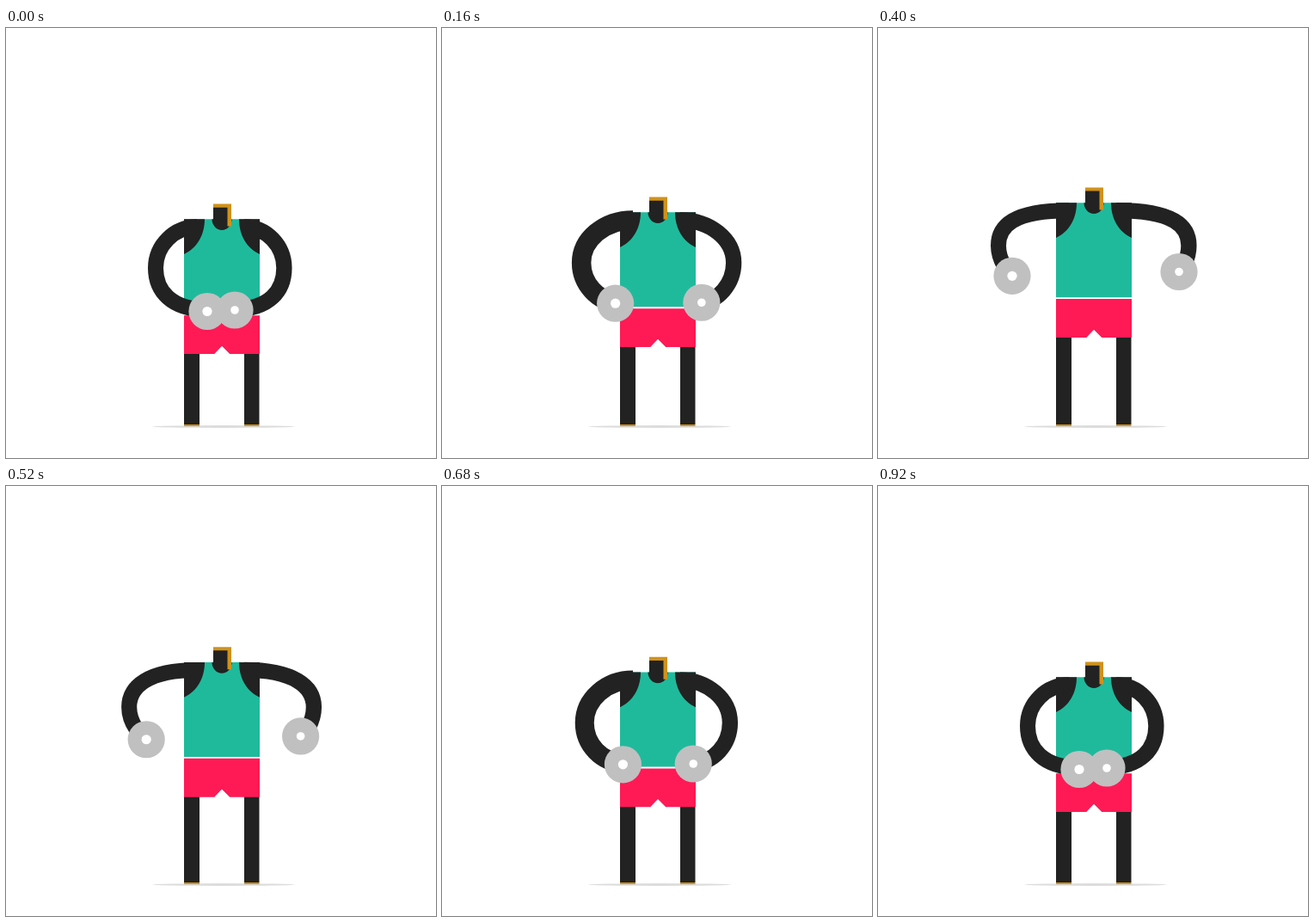
These frames come from a looping animation (500 by 500 pixels, 1000 ms). An HTML page:

```html
<!DOCTYPE html>
<html>
<head>
<meta charset="utf-8">
<title>Dumbbell lift</title>
<style>
  html, body { margin: 0; height: 100%; overflow: hidden; background: #fff; }
  svg { display: block; width: 100vw; height: 100vh; }
  .arm { fill: none; stroke: #222; }
</style>
</head>
<body>
<svg viewBox="0 0 500 500">
  <ellipse cx="253" cy="463.5" rx="83" ry="1.4" fill="#dcdcdc"/>
  <path d="M207 340h18v121h-18zM277 340h17.5v121h-17.5z" fill="#222"/>
  <path d="M207 461h18v2h-18zM277 461h17.5v2h-17.5z" fill="#d0921b"/>
  <g id="body">
    <path d="M207 331h88v4h-88z" fill="#fff"/>
    <path d="M207 222.3h88v110h-88z" fill="#1fba9c"/>
    <path d="M207 334.2h88V379H260L251 370 242.5 379H207z" fill="#ff1a55"/>
    <path d="M242.5 379L251 370 260 379z" fill="#fff"/>
    <path d="M207 222.3h24C231 241 222 256 207 263zM295 222.3h-24C271 241 280 256 295 263z
             M241 207h17v15.3h4.5a11.5 12.7 0 0 1-23 0h1.5z" fill="#222"/>
    <path d="M241 204.5h21V230.5h-4.5V208.7H241z" fill="#d0921b"/>
  </g>
  <path class="arm" id="armL"/>
  <path class="arm" id="armR" stroke-width="18.3"/>
  <g id="plateL"><circle r="21.6" fill="#c0c0c0"/><circle r="5.6" fill="#fff"/></g>
  <g id="plateR"><circle r="21.6" fill="#c0c0c0"/><circle r="4.8" fill="#fff"/></g>
</svg>
<script>
const el = id => document.getElementById(id);

// [ms, height of the lift]; flat at rest and at the top
const keys = [[0, 0], [160, .415], [280, .888], [400, 1], [520, .908],
              [560, .795], [600, .6], [760, .11], [920, 0]];

const rate = i => (keys[i + 1][1] - keys[i][1]) / (keys[i + 1][0] - keys[i][0]);

function slope(i) {
  if (i === 0 || i === 3 || i === keys.length - 1) return 0;
  const before = keys[i][0] - keys[i - 1][0], after = keys[i + 1][0] - keys[i][0];
  return (before * rate(i) + after * rate(i - 1)) / (before + after);
}

function lift(t) {
  const i = keys.findIndex((k, n) => n + 1 < keys.length && t < keys[n + 1][0]);
  if (i < 0) return 0;
  const [t0, a] = keys[i], [t1, b] = keys[i + 1];
  const h = t1 - t0, u = (t - t0) / h, v = 1 - u;
  return a * (1 + 2 * u) * v * v + b * u * u * (3 - 2 * u)
       + h * u * v * (slope(i) * v - slope(i + 1) * u);
}

// Shoulder to elbow to hand, with a vertical tangent at the elbow
function arm(sx, sy, ex, ey, hx, hy, p) {
  const k = .55 + .25 * p ** 4, grip = .7 - .5 * p;
  return `M${sx} ${sy}C${sx + (ex - sx) * k} ${sy} ${ex} ${ey - (ey - sy) * .55} ${ex} ${ey}`
       + `C${ex} ${ey + (hy - ey) * .55} ${hx - (hx - ex) * grip} ${hy} ${hx} ${hy}`;
}

function place(id, x, y) {
  el(id).setAttribute('transform', `translate(${x} ${y})`);
}

function draw(now) {
  const p = lift(Math.floor(now % 1000 / 40) * 40);
  const rise = -19.1 * p;
  const shoulder = 231.3 + rise, elbow = 279 - 6 * p - 20 * p * p;
  const lx = 234 - 78 * p, ly = 329.5 - 9.2 * p - 32 * p * p;
  const rx = 266 + 88 * p - 4 * p * p, ry = 328 - 4.5 * p - 40 * p * p;
  const width = 18 + 130 * p ** 2 * (1 - p) ** 3;

  place('body', 0, rise);
  place('plateL', lx, ly);
  place('plateR', rx, ry);
  el('armL').setAttribute('stroke-width', width);
  el('armL').setAttribute('d',
    arm(222, shoulder, 165 - 34 * p + width / 2, elbow, lx, ly - 2, p));
  el('armR').setAttribute('d',
    arm(277, shoulder, 323.4 + 38 * p, elbow, rx, ry - 1, p));
  requestAnimationFrame(draw);
}
draw(0);
</script>
</body>
</html>
```
